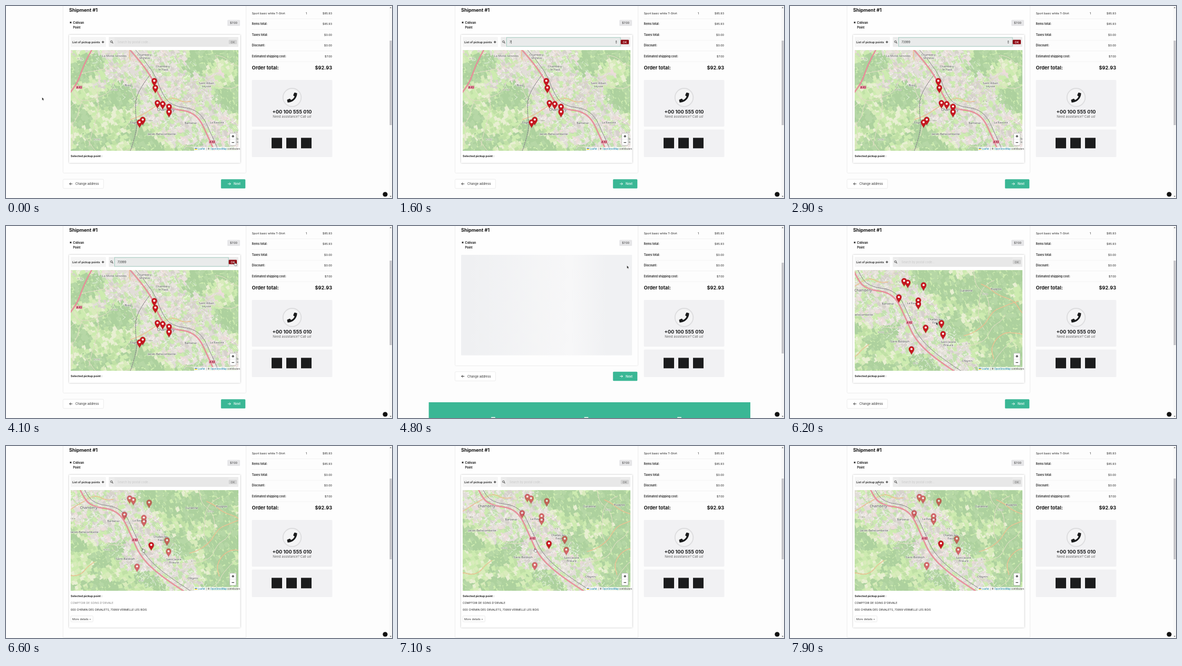
Write an HTML page that moves like this. It is 734 px wide and 366 px high and loops after 8000 ms.

```html
<!DOCTYPE html>
<html lang="en">
<head>
<meta charset="utf-8">
<title>Pickup point checkout</title>
<style>
html, body { margin: 0; width: 100%; height: 100%; overflow: hidden; background: #fdfdfd; }
svg { display: block; width: 100vw; height: 100vh; font-family: Inter, sans-serif; }
.panel { filter: drop-shadow(0 0 1.6px rgba(0,0,0,.28)); }
.place { font-family: "Noto Sans", sans-serif; stroke: #fff; stroke-opacity: .7; stroke-width: 1.2; paint-order: stroke; stroke-linejoin: round; }
</style>
</head>
<body>
<svg id="stage" viewBox="0 0 734 366"></svg>
<script>
const DURATION = 8000;
const stage = document.getElementById('stage');

let seed = 11;
const random = () => (seed = seed * 16807 % 2147483647) / 2147483647;
const between = (a, b) => a + (b - a) * random();
const pick = list => list[Math.floor(random() * list.length)];
const repeat = (n, make) => Array.from({ length: n }, (_, i) => make(i)).join('');

// ---------- drawing helpers ----------
const text = (x, middle, s, size = 5.4, weight = 400, fill = '#222', anchor = 'start', extra = '') =>
  `<text x="${x}" y="${middle + size * .36}" font-size="${size}" font-weight="${weight}" fill="${fill}" text-anchor="${anchor}" ${extra}>${s}</text>`;
const rect = (x, y, w, h, fill, extra = '') =>
  `<rect x="${x}" y="${y}" width="${w}" height="${h}" fill="${fill}" ${extra}/>`;
const stroke = (d, color, width, extra = '') =>
  `<path d="${d}" fill="none" stroke="${color}" stroke-width="${width}" ${extra}/>`;
const points = s => s.split(' ').map(p => p.split(',').map(Number));

// Smooth open curve through the midpoints of a polyline.
function curve(p) {
  const middle = (a, b) => `${(a[0] + b[0]) / 2},${(a[1] + b[1]) / 2}`;
  return `M${p[0]}` + p.slice(1, -1).map((q, i) => `Q${q} ${middle(q, p[i + 2])}`).join('') + `L${p.at(-1)}`;
}
const road = (d, edge, fill, width) => stroke(d, edge, width) + stroke(d, fill, width * .65);
const rail = d => stroke(d, '#77777a', 1) + stroke(d, '#d9d9d9', .4, 'stroke-dasharray="2 2"');

// ---------- map: a diagonal urban valley between wooded hills ----------
const LEFT = 100, RIGHT = 625, TOP = 70, BOTTOM = 375;
const valleyX = y => 235 + .92 * (y - 85);
const valleyWidth = y => 110 - .2 * (y - 85);
const offValley = (x, y) => (x - valleyX(y)) / valleyWidth(y);
const relief = (x, y) => (Math.sin(x / 17 + 1.6 * Math.sin(y / 23)) + Math.sin(y / 13 + 1.4 * Math.sin(x / 29))) / 2;

function landColor(x, y) {
  const side = offValley(x, y), bumps = relief(x, y) + between(-.25, .25);
  if (Math.abs(side) + .5 * bumps < .9)
    return pick(['#e1ddd8', '#e1ddd8', '#e1ddd8', '#e1ddd8', '#e9e4de', '#d6d1cc', '#ecdcda', '#cdebb0', '#c3e0b0']);
  const hills = side > 1.5 ? .75 : .1;
  if (bumps + hills > .2) return pick(['#add19e', '#add19e', '#add19e', '#b6d7a6']);
  return pick(['#cdebb0', '#cdebb0', '#d9ebbc', '#e8efd2', '#c0e0a6']);
}

function terrain() {
  const layers = {}, step = 6;
  for (let y = TOP; y < BOTTOM; y += step)
    for (let x = LEFT; x < RIGHT; x += step) {
      const cx = x + between(-2, 2), cy = y + between(-2, 2), r = () => between(3, 6.5);
      const color = landColor(x, y);
      layers[color] = (layers[color] || '') + `M${cx - r()},${cy - 2}L${cx + 1},${cy - r()}L${cx + r()},${cy + 2}L${cx - 1},${cy + r()}Z`;
    }
  return Object.entries(layers).map(([color, d]) => `<path d="${d}" fill="${color}"/>`).join('');
}

// Short streets follow or cross the valley.
function streets(count) {
  return repeat(count, () => {
    const y = between(TOP, BOTTOM), x = valleyX(y) + between(-1, 1) * valleyWidth(y);
    const angle = .83 + pick([0, Math.PI / 2]) + between(-.4, .4), length = between(3, 9);
    return `M${x},${y}q${between(-2, 6)},${between(-2, 6)} ${length * Math.cos(angle)},${length * Math.sin(angle)}`;
  });
}

function meander(steps) {
  let y = between(TOP, BOTTOM), x = between(LEFT, RIGHT), heading = between(0, 6.3);
  return curve(Array.from({ length: steps }, () => {
    heading += between(-.7, .7);
    return [x += 16 * Math.cos(heading), y += 16 * Math.sin(heading)];
  }));
}

const westMotorway = curve(points('118,170 135,150 147,114 165,80'));
const valleyRoad = curve(points('228,75 274,126 289,169 308,196 362,202 387,255 402,290 437,325 505,370'));
const westRail = curve(points('275,130 247,165 246,205 250,235 232,290'));

const places = [
  ['La Motte-Servolex', 206, 95], ['Chambéry-', 264, 93], ['le Vieux', 264, 99], ['Chambéry-', 299, 115], ['le Haut', 299, 121],
  ['Bissy', 232, 151], ['Chambéry', 304, 197.5], ['Barberaz', 351, 223], ['La Ravoire', 401, 222], ['Saint Alban', 381, 147], ['Leysse', 381, 153],
  ['Cognin', 245, 222], ['Jacob-Bellecombette', 296, 244], ['Challes-les-', 442, 253], ['Eaux', 442, 259], ['Saint Jeoire', 466, 296],
  ['Prieuré', 466, 302], ['Saint-Baldoph', 374, 295], ['Curienne', 500, 198], ['Puygros', 557, 195], ['Chignin', 502, 332],
];
const roadNames = ['D 15', 'D 916', 'D 16a', 'D 7', 'D 1006', 'D 16', 'D 912', 'D 12', 'D 11', 'D 4', 'D 21', 'D 19', 'D 21a', 'D 5'];
const roadLabel = (s, i) => text(140 + i * 33, TOP + 30 + (i * .618 % 1) * 250, s, 4.3, 500, '#6d6a55', 'middle', 'class="place"');
const motorwayLabel = (x, y) => rect(x - 6, y - 3, 12, 6, '#e892a2', 'rx="1"') + text(x, y, 'A 43', 4.4, 600, '#7c1330', 'middle');

const mapWorld = rect(LEFT, TOP, RIGHT - LEFT, BOTTOM - TOP, '#cdebb0') + terrain() +
  stroke(streets(700), '#fff', .7) + stroke(streets(350), '#c6c1bd', .5) +
  repeat(34, () => road(meander(8), '#bcbaa6', '#fbf9dc', 1)) +
  repeat(9, () => road(meander(9), '#d5a579', '#fbd7a8', 1.4)) +
  rail(westRail) + `<g transform="translate(6 -5)">${rail(valleyRoad)}</g>` +
  [westMotorway, valleyRoad].map(d => road(d, '#d8707f', '#ec9aa5', 2.4)).join('') +
  roadNames.map(roadLabel).join('') + motorwayLabel(139, 155) + motorwayLabel(392, 259) +
  places.map(([s, x, y]) => text(x, y, s, s === 'Chambéry' ? 6.8 : 5.5, 400, '#4a4a4a', 'middle', 'class="place"')).join('');

const pin = ([x, y]) => `<g transform="translate(${x} ${y})"><path d="M0,10.3C-1,6.5-5.1,4-5.1,-.5A5.1,5.1 0 0 1 5.1,-.5C5.1,4 1,6.5 0,10.3Z" fill="#c8171f" stroke="#8f1820" stroke-width=".4"/><circle cy="-.5" r="2" fill="#fff"/></g>`;
const firstPins = points('282,143 284,156 288,185 298,187 310,192 310,202 260,217 254,222');
const nextPins = points('382,180 389,183 419,188 372,211 409,217 409,224 453,260 456,281 396,310');
const chosenPin = [423, 269];

// ---------- page ----------
const ROW = 20.4;
const totals = [['Items total:', '$85.93'], ['Taxes total:', '$0.00'], ['Discount:', '$0.00'], ['Estimated shipping cost:', '$7.00']];
const summary =
  text(467.5, 14, 'Sport basic white T-Shirt') + text(571, 14, '1', 5.4, 400, '#222', 'middle') + text(620, 14, '$85.93', 5.4, 400, '#222', 'end') +
  repeat(5, i => stroke(`M467.5,${24.5 + i * ROW}H620.5`, '#ebebeb', .6)) +
  totals.map(([label, price], i) => text(467.5, 34.5 + i * ROW, label, 5.5, 600) + text(620, 34.5 + i * ROW, price, 5.4, 400, '#222', 'end')).join('') +
  text(467.5, 117.8, 'Order total:', 9.25, 700, '#161616') + text(620.3, 117.8, '$92.93', 9.25, 700, '#161616', 'end') +
  rect(467.5, 141, 153, 89, '#f1f1f3', 'rx="1.5"') + rect(467.5, 235.5, 153, 52.5, '#f1f1f3', 'rx="1.5"') +
  '<circle cx="544" cy="174.3" r="17.3" fill="#f4f4f5" stroke="#dcdcde" stroke-width="1.8"/>' +
  '<path transform="translate(534.5 165)" fill="#1b1c1d" d="M18.5.9L14.6 0Q14 0 13.6.5L11.8 4.7Q11.6 5.4 12 5.8L14.3 7.6Q12.2 12.2 7.6 14.3L5.8 12Q5.4 11.6 4.7 11.8L.5 13.6Q0 14 0 14.6L.9 18.5Q1.1 19 1.8 19C11 19 19 11 19 1.8Q19 1.1 18.5.9Z"/>' +
  text(544, 201.3, '+00 100 555 010', 9.2, 700, '#1b1c1d', 'middle') +
  text(544, 211.3, 'Need assistance? Call us!', 6.1, 400, '#666', 'middle') +
  repeat(3, i => rect(505 + i * 28, 251.3, 20, 20, '#1b1c1d'));

const heading =
  text(120, 7.4, 'Shipment #1', 9.05, 700, '#161616') +
  '<circle cx="123" cy="31.5" r="2.4" fill="#fff" stroke="#cfcfcf" stroke-width=".6"/><circle cx="123" cy="31.5" r="1.4" fill="#111"/>' +
  text(127.5, 32, 'Colivan', 5.6, 700) + text(127.5, 40.8, 'Point', 5.6, 700) +
  rect(421, 26.5, 24, 11.5, '#e6e6e8', 'rx="1.5"') + text(433, 32.3, '$7.00', 5.4, 400, '#333', 'middle');

const arrow = (x, dir, color) => stroke(`M${x - 2.7 * dir},339H${x + 2.7 * dir}M${x + .3 * dir},336.6L${x + 2.7 * dir},339L${x + .3 * dir},341.4`, color, .9);
const buttons =
  rect(108.5, 330.3, 77, 17.4, '#fff', 'rx="1.5" stroke="#e6e6e6" stroke-width=".7"') + arrow(123.5, -1, '#222') + text(132, 339, 'Change address', 5.75, 400, '#333') +
  rect(408.8, 330.2, 46.4, 17.6, '#3ab795', 'rx="1.5"') + arrow(424.5, 1, '#fff') + text(433, 339, 'Next', 5.8, 500, '#fff');

const toolbar =
  rect(123, 59, 67, 19, '#f5f5f5', 'rx="1"') + text(126, 68.7, 'List of pickup points', 5.4, 600) + stroke('M182,68.7H186.6M184.3,66.4V71', '#222', 1.1) +
  rect(195.5, 59, 246.5, 19, '#ececec', 'rx="1"') +
  '<circle cx="200.5" cy="68" r="1.8" fill="none" stroke="#444" stroke-width=".9"/>' + stroke('M201.8,69.4L203.6,71.2', '#444', 1.1) +
  rect(206.5, 60, 216.5, 17, '#e8e8e8', 'id="field" stroke-width=".9"') +
  text(212, 68.7, 'Search by postal code...', 5.5, 400, '#c9c9c9', 'start', 'id="placeholder"') +
  text(212, 68.7, '', 5.5, 400, '#333', 'start', 'id="typed"') +
  '<path id="caret" d="M0,65.5V71.8" stroke="#222" stroke-width=".6"/>' +
  '<path id="spinner" d="M413.4,68L415,65.8L416.6,68ZM413.4,69.4L415,71.6L416.6,69.4Z" fill="#555"/>' +
  rect(423.5, 64.5, 15.5, 8.3, '#d3d3d3', 'id="okBox" rx="1.2"') + text(431.2, 68.7, 'OK', 5.3, 500, '#777', 'middle', 'id="okText"');

const mapChrome =
  rect(425.5, 242.5, 12, 23, '#fff', 'rx="1.5" stroke="#b9b9b9" stroke-width=".8"') + stroke('M425.5,254H437.5', '#ccc', .5) +
  stroke('M429.2,248.3H434M431.6,245.9V250.7M429.2,260.2H434', '#111', 1.1) +
  rect(357.5, 268.8, 84.5, 7.2, '#fff', 'fill-opacity=".8"') +
  rect(359, 270.6, 4.4, 1.6, '#4c7be1') + rect(359, 272.2, 4.4, 1.6, '#ffd500') +
  text(365, 272.3, '<tspan fill="#0078a8">Leaflet</tspan>', 4.2) + text(381, 272.3, '| © <tspan fill="#0078a8">OpenStreetMap</tspan> contributors', 4.2, 400, '#333');

const details =
  text(123, 299, "COMPTOIR DE SOINS D'ORVALE", 5.25, 400, '#222', 'start', 'id="shop"') +
  text(123, 312, '000 CHEMIN DES ORVALETS, 73999 VERMELLE LES BOIS', 5.25) +
  rect(123.3, 323.8, 42.2, 11.4, '#fff', 'rx="1.5" stroke="#dcdcdc" stroke-width=".6"') + text(126, 329.6, 'More details +', 5.3, 400, '#333');

stage.innerHTML = `
  <defs>
    <clipPath id="mapClip"><rect x="123" y="84.3" width="319" height="191.7"/></clipPath>
    <linearGradient id="shimmer"><stop offset=".05" stop-color="#eff0f2"/><stop offset=".64" stop-color="#f7f7f8"/><stop offset=".85" stop-color="#f0f1f3"/></linearGradient>
  </defs>
  ${rect(0, 0, 734, 366, '#fdfdfd')}
  ${rect(108.5, -10, 348, 328.5, '#fefefe', 'id="card" rx="2" stroke="#e9e9e9" stroke-width=".8"')}
  ${heading}${summary}
  <g id="buttons">${buttons}</g>
  <g id="pickup">
    ${rect(120, 55, 325.5, 244, '#fff', 'id="panel" class="panel"')}
    ${toolbar}
    <g clip-path="url(#mapClip)"><g id="world">${mapWorld}
      <g id="firstPins">${firstPins.map(pin).join('')}</g>
      <g id="nextPins"><g id="otherPins">${nextPins.map(pin).join('')}</g>${pin(chosenPin)}</g>
    </g></g>
    ${mapChrome}
    ${text(123, 285.8, 'Selected pickup point :', 5.4, 700)}
    <g id="details">${details}</g>
  </g>
  <g id="loading">
    ${rect(120, 55, 325, 191.5, 'url(#shimmer)', 'rx="1"')}
    ${rect(58.5, 336, 611.5, 30, '#3ab795')}
    ${repeat(3, i => rect(177 + i * 177, 364, 8, 2, '#c9ecdf', 'rx=".8"'))}
  </g>
  ${rect(728.6, 0, 5.4, 366, '#f8f8f8')}
  ${rect(729.5, 66, 4, 161, '#c4c3c8', 'id="thumb"')}
  <path d="M729.8,4L731.3,2L732.8,4ZM729.8,362L731.3,364L732.8,362Z" fill="#555"/>
  <circle cx="721" cy="359" r="4.6" fill="#111"/>
  <g id="cursor" stroke="#fff" stroke-width=".5">
    <path id="arrow" d="M0,0V5.8L1.3,4.6L2.3,6.7L3.2,6.3L2.3,4.3H4.1Z" fill="#111"/>
    <path id="hand" d="M-.6,0Q0-.7.6,0V2.3L3.6,2.9Q4.2,3.1 4.1,3.8L3.6,6.8H.1L-1.9,4.2Q-2,3.4-1.2,3.5L-.6,4Z" fill="#fff" stroke="#222"/>
    <path id="beam" d="M-1.2,-3.2H1.2M0,-3.2V3.2M-1.2,3.2H1.2" fill="none" stroke="#222"/>
  </g>`;

// ---------- timeline ----------
const el = Object.fromEntries([...stage.querySelectorAll('[id]')].map(e => [e.id, e]));
const show = (e, on) => e.setAttribute('display', on ? 'inline' : 'none');
const clamp = v => Math.min(1, Math.max(0, v));
const smooth = v => v * v * (3 - 2 * v);

const TYPE_START = 1600, KEY_TIME = 225, SUBMIT = 4200, LOADED = 5000, CHOOSE = 6500;
const moves = [
  { from: 100, to: 900, x: 330, y: 69 },
  { from: 3300, to: 4000, x: 435, y: 69 },
  { from: 4350, to: 4500, x: 435.3, y: 75.3 },
  { from: 5600, to: 6350, x: 260, y: 195.5 },
  { from: 7300, to: 7900, x: 168, y: 67.5 },
];
const pointer = t => moves.reduce(([x, y], m) => {
  const k = smooth(clamp((t - m.from) / (m.to - m.from)));
  return [x + (m.x - x) * k, y + (m.y - y) * k];
}, [68.5, 174]);

function pointerKind(x, y, t) {
  const overPin = t >= LOADED && y > 185, overList = x < 190 && y < 78;
  if (t < SUBMIT && y < 77) return x < 423 ? 'beam' : 'hand';
  return overPin || overList ? 'hand' : 'arrow';
}

function render(t) {
  const loading = t >= SUBMIT && t < LOADED, relocated = t >= LOADED, chosen = t >= CHOOSE;
  const typed = relocated ? '' : '73999'.slice(0, Math.max(0, Math.floor((t - TYPE_START) / KEY_TIME) + 1));
  const focused = t >= 1000 && t < SUBMIT;

  show(el.pickup, !loading);
  show(el.loading, loading);
  show(el.details, chosen);
  el.shop.setAttribute('opacity', .45 + .55 * clamp((t - CHOOSE - 50) / 250));
  el.panel.setAttribute('height', chosen ? 291 : 244);
  el.card.setAttribute('height', loading ? 276.5 : chosen ? 375.5 : 328.5);
  el.buttons.setAttribute('transform', `translate(0 ${loading ? -52.5 : chosen ? 47 : 0})`);
  const [top, length] = loading ? [70, 173] : chosen ? [62, 154] : [66, 161];
  el.thumb.setAttribute('y', top);
  el.thumb.setAttribute('height', length);

  const pan = 1 - (1 - clamp((t - CHOOSE) / 260)) ** 2;
  el.world.setAttribute('transform', relocated ? `translate(${-165 + 29 * pan} ${-75 - 8 * pan})` : '');
  show(el.firstPins, !relocated);
  show(el.nextPins, relocated);
  el.otherPins.setAttribute('opacity', chosen ? .6 : 1);

  el.field.setAttribute('stroke', focused ? '#9ccbbd' : 'none');
  el.field.setAttribute('fill', focused ? '#e9ebeb' : '#e8e8e8');
  show(el.placeholder, !typed);
  el.typed.textContent = typed;
  show(el.caret, focused && t < 2800);
  el.caret.setAttribute('transform', `translate(${212.4 + (typed ? el.typed.getComputedTextLength() : 0)} 0)`);
  el.okBox.setAttribute('fill', typed ? '#8d0710' : '#d3d3d3');
  el.okText.setAttribute('fill', typed ? '#fff' : '#777');

  const [x, y] = pointer(t), kind = pointerKind(x, y, t);
  for (const name of ['arrow', 'hand', 'beam']) show(el[name], name === kind);
  show(el.spinner, kind === 'beam');
  show(el.cursor, t < TYPE_START || t >= moves[1].from);
  el.cursor.setAttribute('transform', `translate(${x} ${y})`);
}

const start = performance.now();
function tick() {
  render((performance.now() - start) % DURATION);
  requestAnimationFrame(tick);
}
tick();
</script>
</body>
</html>
```
